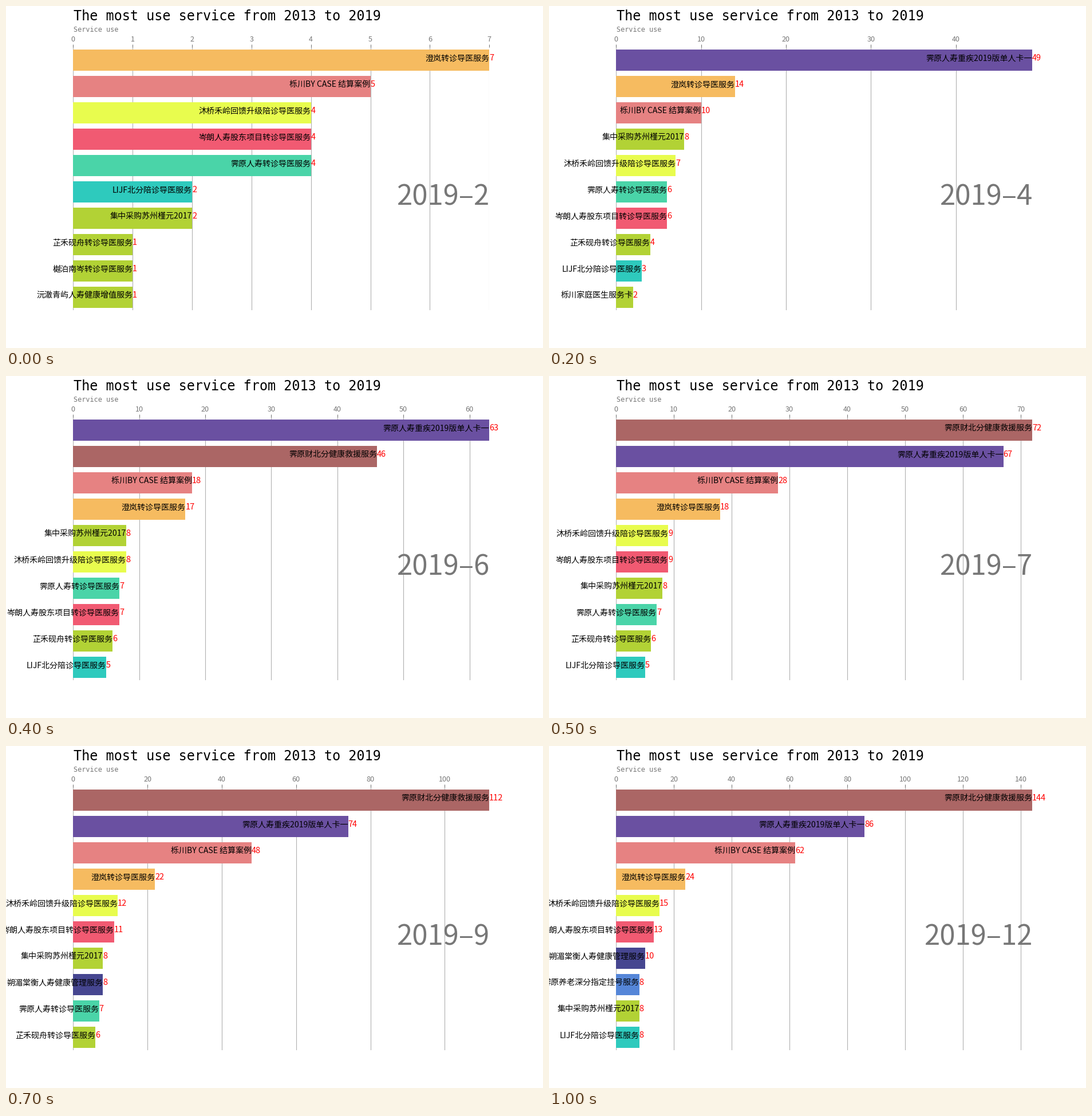
Recreate the animation shown at these times as a matplotlib script. Size 938x597 px, loop 1100 ms.

```python
import matplotlib.pyplot as plt
from matplotlib.animation import FuncAnimation
from matplotlib.ticker import StrMethodFormatter

W, H, DPI = 938, 597, 72  # at 72 dpi a point is a pixel
GREY, GREEN = "#777777", "#b2d235"
MONO = "DejaVu Sans Mono"

SERVICES = {
    "H": ("澄岚转诊导医服务", "#f6bb60"),
    "B": ("栎川BY CASE 结算案例", "#e68282"),
    "U": ("沐桥禾岭回馈升级陪诊导医服务", "#e8fc4e"),
    "Z": ("岑朗人寿股东项目转诊导医服务", "#f15a72"),
    "T": ("霁原人寿转诊导医服务", "#4ad4a8"),
    "P": ("LIJF北分陪诊导医服务", "#2ecabd"),
    "S": ("集中采购苏州槿元2017", GREEN),
    "Y": ("芷禾砚舟转诊导医服务", GREEN),
    "K": ("樾泊南岑转诊导医服务", GREEN),
    "L": ("沅澈青屿人寿健康增值服务", GREEN),
    "J": ("天津槿元健康管家金卡", GREEN),
    "C": ("霁原人寿重疾2019版单人卡一", "#6a50a1"),
    "F": ("栎川家庭医生服务卡", GREEN),
    "R": ("霁原财北分健康救援服务", "#ab6665"),
    "X": ("朔湄棠衡人寿健康管理服务", "#464690"),
    "G": ("霁原养老深分指定挂号服务", "#5586d8"),
}

# Monthly top ten from February on: service key and running total
RANKS = [
    "H7 B5 U4 Z4 T4 P2 S2 Y1 K1 L1",
    "H9 U6 B5 S5 T5 Z4 Y2 L2 P2 J1",
    "C49 H14 B10 S8 U7 T6 Z6 Y4 P3 F2",
    "C57 R18 H16 B13 S8 U7 T7 Z6 Y5 P4",
    "C63 R46 B18 H17 S8 U8 T7 Z7 Y6 P5",
    "R72 C67 B28 H18 U9 Z9 S8 T7 Y6 P5",
    "R96 C70 B39 H20 U10 Z10 S8 T7 X7 Y6",
    "R112 C74 B48 H22 U12 Z11 S8 X8 T7 Y6",
    "R127 C78 B56 H23 U14 Z12 G8 X8 S8 Y7",
    "R136 C82 B59 H24 U14 Z12 X9 G8 S8 Y7",
    "R144 C86 B62 H24 U15 Z13 X10 G8 S8 P8",
]

plt.rcParams["font.family"] = "Noto Sans CJK JP"
fig = plt.figure(figsize=(W / DPI, H / DPI), dpi=DPI, facecolor="white")
ax = fig.add_axes([0.125, 0.11, 0.775, 0.77])


def heading(text, baseline, size, color):
    fig.text(118 / W, 1 - baseline / H, text, family=MONO, size=size,
             color=color, va="baseline")


heading("The most use service from 2013 to 2019", 25, 23.55, "black")
heading("Service use", 45, 11.8, GREY)


def style_axes(top):
    ax.clear()
    ax.set_frame_on(False)
    ax.set_xlim(0, top)
    ax.set_ylim(9.498, -0.498)
    ax.set_yticks([])
    ax.xaxis.set_ticks_position("top")
    ax.xaxis.set_major_formatter(StrMethodFormatter("{x:.0f}"))
    ax.tick_params(axis="x", colors=GREY, labelsize=12.6, length=4.9,
                   width=1.1, pad=2.2)
    ax.grid(axis="x", color="#b0b0b0", linestyle="-", linewidth=1.1)
    ax.set_axisbelow(True)


def draw(month):
    rows = [(item[0], int(item[1:])) for item in RANKS[month].split()]
    style_axes(rows[0][1])
    for y, (key, value) in enumerate(rows):
        name, color = SERVICES[key]
        ax.barh(y, value, height=0.8, color=color)
        base = y + 0.015
        ax.text(value, base, name, size=14.05, ha="right", va="baseline")
        ax.text(value, base, str(value), size=14.5, color="red",
                ha="left", va="baseline")
    ax.text(1, 0.4, f"2019–{month + 2}", transform=ax.transAxes, size=49,
            color=GREY, ha="right", va="baseline")
    return []


anim = FuncAnimation(fig, draw, frames=len(RANKS), interval=100,
                     repeat=True, repeat_delay=0)
plt.show()
```
